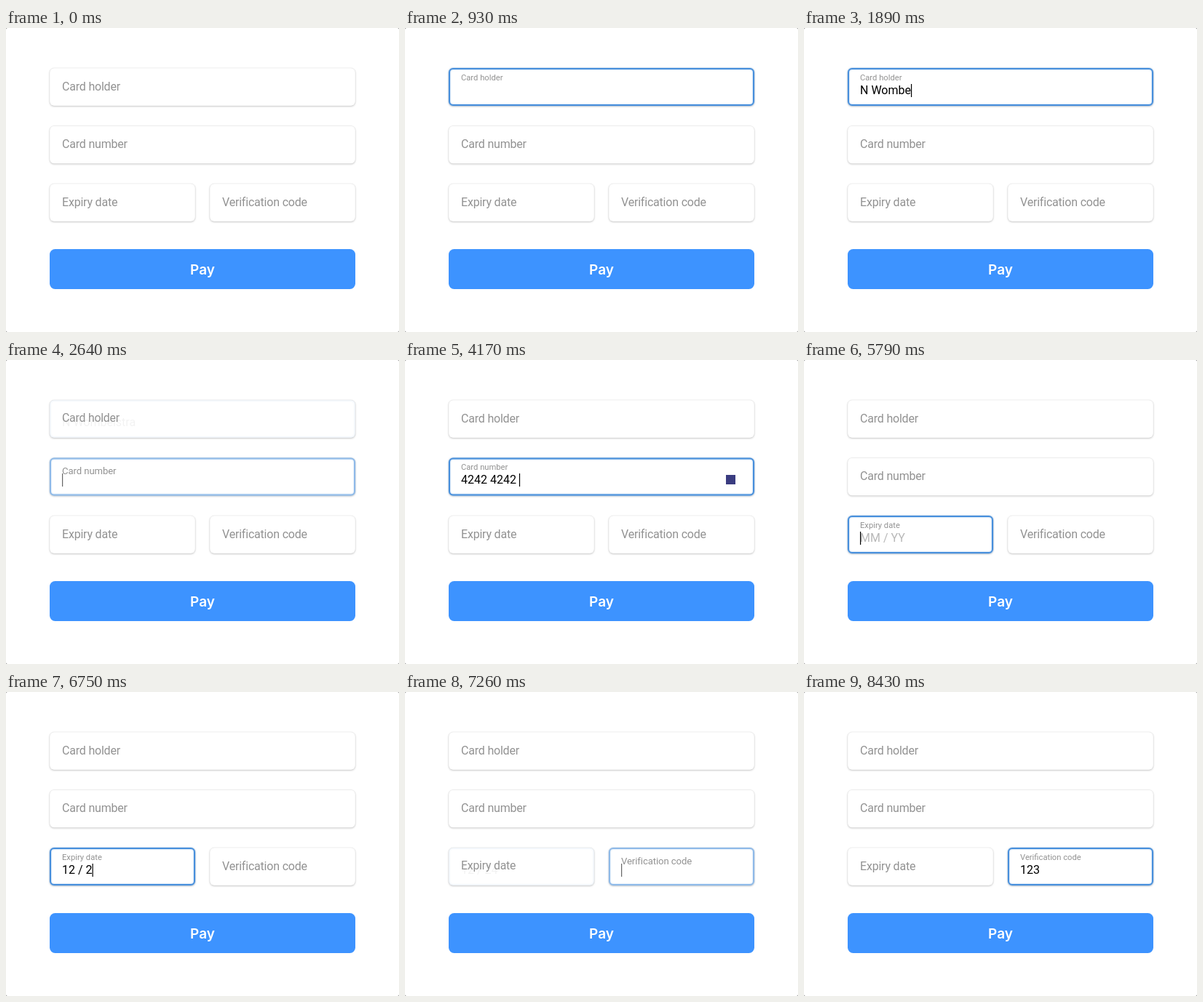
Animation of 540x418 px, one loop 8520 ms. Source, as an HTML page:

```html
<!DOCTYPE html>
<html lang="en">
<head>
<meta charset="utf-8">
<title>Card form</title>
<style>
  html, body { margin: 0; width: 100%; height: 100%; overflow: hidden; background: #777; }
  svg { display: block; width: 540px; height: 418px; font: 16px Roboto, sans-serif; }
  text { white-space: pre; }
  .box { fill: #fff; stroke: #000; stroke-opacity: .06; filter: drop-shadow(0 1px 1px rgba(0, 0, 0, .19)); }
  .ring { fill: none; stroke: #478fdc; stroke-width: 2; filter: drop-shadow(0 0 1px rgba(71, 143, 220, .5)); }
  .label { fill: #929292; }
  .hint { fill: #b8b8b8; }
  .pay { font: 600 19px Inter, sans-serif; fill: #fff; text-anchor: middle; }
</style>
</head>
<body>
<svg id="stage" viewBox="0 0 540 418">
  <rect width="540" height="418" rx="2" fill="#fff"/>
  <rect x="60" y="304" width="420" height="55" rx="7.5" fill="#3d93ff"/>
  <text class="pay" x="270" y="338.5">Pay</text>
</svg>
<script>
const LOOP = 8520, STEP = 30, BLINK = 450;
const stage = document.getElementById('stage');

const spread = (first, last, count) =>
  Array.from({ length: count }, (_, i) => first + (last - first) * i / (count - 1));

const groupDigits = s => s.replace(/(\d{4})(?=\d|$)/g, '$1 ').slice(0, 19);
const slashDate = s => s.length < 2 ? s : s.slice(0, 2) + ' / ' + s.slice(2);

const fields = [
  { label: 'Card holder', x: 60, y: 55, width: 420, start: 480, end: 2610,
    keys: 'N Wombelstra', times: [...spread(1050, 1890, 7), ...spread(2010, 2430, 5)] },
  { label: 'Card number', x: 60, y: 134.5, width: 420, start: 2610, end: 5730,
    keys: '4242'.repeat(4), format: groupDigits, badge: true,
    times: [...spread(3180, 4050, 7), ...spread(4170, 5100, 7), 5310, 5430] },
  { label: 'Expiry date', x: 60, y: 214, width: 200, start: 5730, end: 7230,
    keys: '1224', format: slashDate, hint: 'MM / YY', times: spread(6330, 6930, 4) },
  { label: 'Verification code', x: 280, y: 214, width: 200, start: 7230, end: LOOP,
    keys: '123', times: spread(7650, 7980, 3) },
];

function add(tag, attrs, text = '') {
  const node = document.createElementNS('http://www.w3.org/2000/svg', tag);
  set(node, attrs);
  node.textContent = text;
  return stage.appendChild(node);
}

function set(node, attrs) {
  for (const name in attrs) node.setAttribute(name, attrs[name]);
}

function build(f) {
  const { x, y, width } = f;
  f.left = x + 17;
  f.top = Math.floor(y);
  add('rect', { class: 'box', x, y, width, height: 52, rx: 6 });
  f.ring = add('rect', { class: 'ring', x: x + 1, y: y + 1, width: width - 2, height: 50, rx: 5 });
  f.labelNode = add('text', { class: 'label', x: f.left }, f.label);
  f.hintNode = add('text', { class: 'hint', x: f.left, y: f.top + 36 }, f.hint);
  f.valueNode = add('text', { x: f.left, y: f.top + 36 });
  f.caret = add('rect', { y: f.top + 22, width: 1.2, height: 18 });
  if (f.badge) f.badgeNode = add('rect', { x: 441, y: f.top + 24, width: 13, height: 13, fill: '#3a3c80' });
}

function focusAmount(f, t) {
  if (t < f.start) return 0;
  if (t < f.end) return Math.min(1, 0.2 + (t - f.start) / 75);
  return Math.max(0, 0.4 - (t - f.end) / 85);
}

function draw(f, t) {
  const focus = focusAmount(f, t);
  const count = f.times.filter(time => time < t + STEP).length;
  const keys = f.keys.slice(0, count);
  const lastEvent = count ? f.times[count - 1] : f.start;
  const caretOn = t < f.end && (t - lastEvent) % (2 * BLINK) < BLINK;

  set(f.ring, { opacity: focus });
  set(f.labelNode, {
    y: f.top + 31 - 14 * focus,
    'font-size': 16 - 4.8 * focus,
    'letter-spacing': -0.2 * (1 - focus),
  });
  f.valueNode.textContent = f.format ? f.format(keys) : keys;
  set(f.valueNode, { opacity: focus });
  set(f.hintNode, { opacity: count ? 0 : focus });
  set(f.caret, {
    x: f.left + f.valueNode.getComputedTextLength(),
    opacity: caretOn ? focus : 0,
  });
  if (f.badgeNode) set(f.badgeNode, { opacity: count ? focus : 0 });
}

function frame() {
  const t = Math.floor(performance.now() % LOOP / STEP) * STEP;
  fields.forEach(f => draw(f, t));
  requestAnimationFrame(frame);
}

fields.forEach(build);
frame();
</script>
</body>
</html>
```
